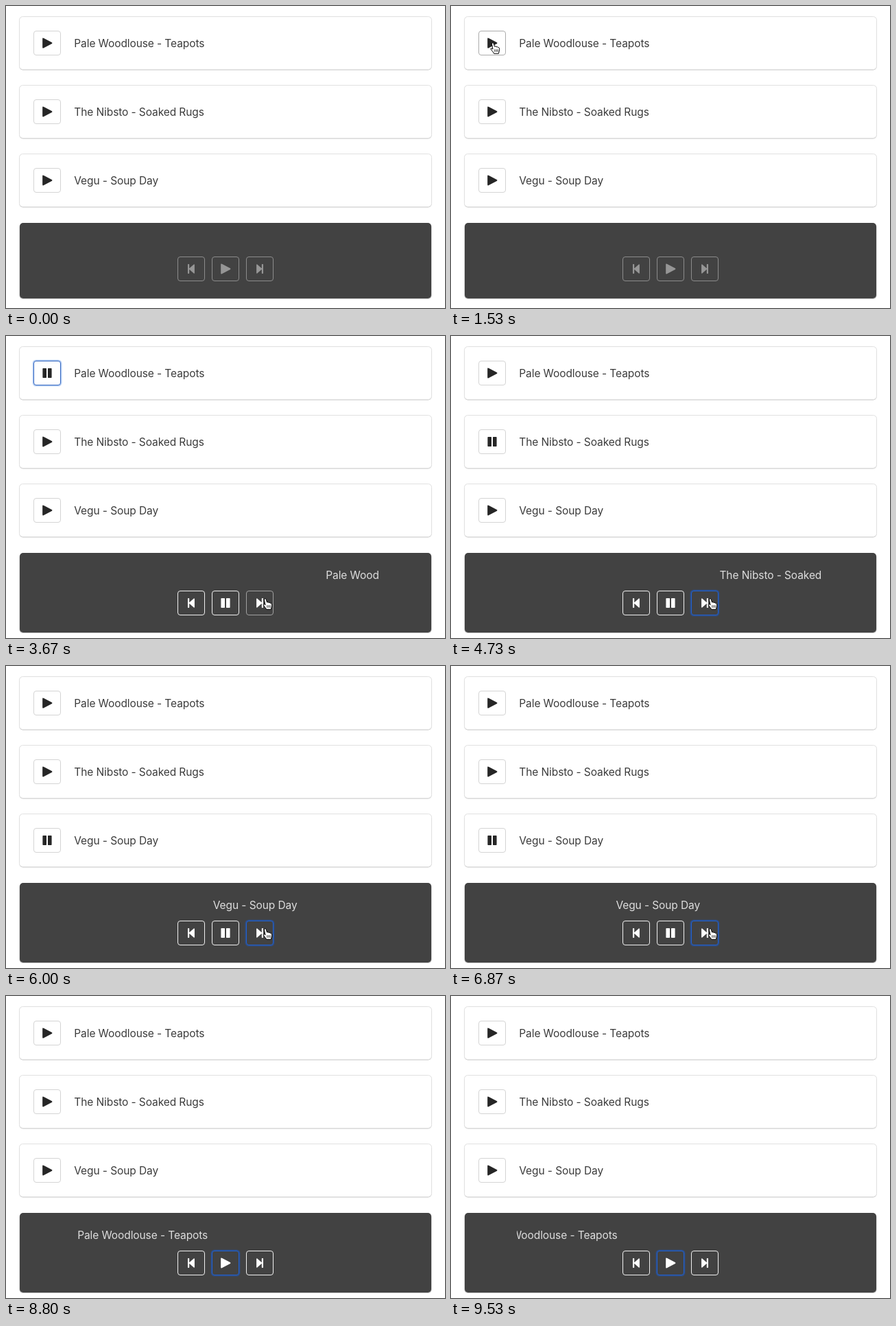
Recreate the animation shown at these times as an HTML page. Size 640 px wide and 440 px high, loop 9590 ms.

```html
<!DOCTYPE html>
<html lang="en">
<head>
<meta charset="utf-8">
<title>Playlist player</title>
<style>
  html, body { margin: 0; width: 100%; height: 100%; overflow: hidden; background: #fff; }
  svg { display: block; width: 640px; height: 440px; }
  text { font: 15.5px Inter, "Open Sans", sans-serif; letter-spacing: -0.09px; fill: #3b3b3b; white-space: pre; }
  .card { fill: #fff; stroke: #e0e0e0; }
  .shade { fill: #c6c6c6; }
  .panel { fill: #424242; }
  .box { fill: none; stroke: #d4d4d4; }
  .ring { fill: none; stroke: #bdd3f5; stroke-width: 2; visibility: hidden; }
  .icon { fill: #262626; stroke: #262626; stroke-width: 1.4; stroke-linejoin: round; }
  .hover .box { stroke: #ababab; }
  .focus .box { stroke: #2f64c0; }
  .focus .ring { visibility: visible; }
  .dark text { fill: #dedede; }
  .dark .box { stroke: #f0f0f0; }
  .dark .icon { fill: #fff; stroke: #fff; }
  .dark .hover .box { stroke: #a0a0a0; }
  .dark .focus .box { stroke: #2062d4; }
  .dark .ring { stroke: #2f4c80; }
  .off .box { stroke: #8c8c8c; }
  .off .icon { fill: #969696; stroke: #969696; }
</style>
</head>
<body>
<svg id="stage" viewBox="0 0 640 440">
  <defs><clipPath id="lane"><rect x="96" y="330" width="448" height="36"/></clipPath></defs>
</svg>
<script>
const LOOP = 9590;
const SONGS = ["Pale Woodlouse - Teapots", "The Nibsto - Soaked Rugs", "Vegu - Soup Day"];
const ICONS = {
  play: "M-6.1 -6.5Q-6.1 -7 -5.6 -6.7L6.4 -.4Q7 0 6.4 .4L-5.6 6.7Q-6.1 7 -6.1 6.5Z",
  pause: "M-5.9 -6.3h4.2v12.6h-4.2ZM1.7 -6.3h4.2v12.6h-4.2Z",
  prev: "M-4.3 -6.3h.8v12.6h-.8ZM4.2 -6L-2.6 0L4.2 6Z",
  next: "M4.3 -6.3h-.8v12.6h.8ZM-4.2 -6L2.6 0L-4.2 6Z"
};

// time, song (-1 = none), playing, focused button
const STATES = [
  [0, -1, false, null],
  [1735, 0, true, "row0"],
  [4010, 1, true, "next"],
  [5800, 2, true, "next"],
  [7140, 0, true, "next"],
  [8270, 0, false, "toggle"]
];

// time, x, y of the pointer's tip
const PATH = [
  [870, 150, 440], [1000, 138, 368], [1250, 92, 165], [1500, 61, 54],
  [2130, 61, 54], [2400, 192, 176], [2680, 330, 335], [2900, 378, 383],
  [7300, 378, 383], [7430, 352, 398], [7600, 322, 388],
  [8390, 322, 388], [8500, 330, 411], [8590, 338, 440]
];

const SPEED = 6 / 85;
const LANE_LEFT = 96, LANE_RIGHT = 544, WRAP = 2570;

const stage = document.getElementById("stage");

function add(parent, tag, attrs = {}, content) {
  const el = document.createElementNS("http://www.w3.org/2000/svg", tag);
  for (const key in attrs) el.setAttribute(key, attrs[key]);
  if (content) el.textContent = content;
  parent.append(el);
  return el;
}

function rect(parent, cls, x, y, width, height, rx) {
  return add(parent, "rect", { class: cls, x, y, width, height, rx });
}

function move(el, x, y) {
  el.setAttribute("transform", `translate(${x} ${y})`);
}

function makeButton(parent, name, x, y, icon) {
  const g = add(parent, "g");
  move(g, x, y);
  rect(g, "ring", -20.5, -18.5, 41, 37, 4.5);
  rect(g, "box", -19.5, -17.5, 39, 35, 3.5);
  return { name, x, y, g, icon: add(g, "path", { class: "icon", d: ICONS[icon] }) };
}

const rows = SONGS.map((song, i) => {
  const y = 54 + i * 100;
  rect(stage, "shade", 19.5, y - 37, 601, 76.4, 5);
  rect(stage, "card", 19.5, y - 38.5, 601, 77, 5);
  add(stage, "text", { x: 99.3, y: y + 6 }, song);
  return makeButton(stage, "row" + i, 60, y, "play");
});

const player = add(stage, "g", { class: "dark" });
const shade = rect(player, "shade", 19.5, 317, 601, 110, 5);
const panel = rect(player, "panel", 20, 316, 600, 110, 5);
const lane = add(player, "g", { "clip-path": "url(#lane)" });
const title = add(lane, "text", { y: 354 });
const controls = add(player, "g");
const prev = makeButton(controls, "prev", 270, 389, "prev");
const toggle = makeButton(controls, "toggle", 320, 389, "play");
const next = makeButton(controls, "next", 370, 389, "next");
const buttons = [...rows, prev, toggle, next];

const arrow = add(stage, "path", {
  d: "M0 0V14.4L3.3 11.3L5.6 16.6L8.2 15.5L5.9 10.3H10.4Z",
  fill: "#000", stroke: "#fff", "stroke-width": 1, "stroke-linejoin": "round"
});
const hand = add(stage, "g");
add(hand, "path", {
  d: "M-1.6 1Q-1.5 -.6 0 -.4Q1 -.2 1.4 1.2L2.5 5Q4.3 4 5 5.4Q6.8 4.7 7.4 6.3Q9 5.8 9.4 7.4Q10 9.6 9.2 12L8.4 15.3H1.6Q.6 13 -1.2 11.2Q-3.7 8.7 -2.8 7.8Q-1.7 7 0 9Z",
  fill: "#fff", stroke: "#000", "stroke-width": 1, "stroke-linejoin": "round"
});
add(hand, "path", { d: "M2.8 9.2v3.6M5 9.2v3.6M7.1 9.2v3.6", stroke: "#000", "stroke-width": .8 });

function pointerAt(t) {
  const i = PATH.findIndex(p => p[0] > t);
  if (i < 1) return null;
  const [t0, x0, y0] = PATH[i - 1], [t1, x1, y1] = PATH[i];
  const k = (t - t0) / (t1 - t0);
  return { x: x0 + (x1 - x0) * k, y: y0 + (y1 - y0) * k };
}

// The strip re-enters from the right once its start reaches the left edge.
function titleX(t) {
  return (t < WRAP ? LANE_LEFT : LANE_RIGHT) - (t - WRAP) * SPEED;
}

function draw(t) {
  const [, song, playing, focused] = STATES.findLast(s => s[0] <= t);
  const idle = song < 0;
  const lift = idle ? -6 : 0;
  const pointer = pointerAt(t);
  let over = false;

  panel.setAttribute("height", 116 + lift);
  shade.setAttribute("height", 116 + lift);
  move(controls, 0, lift);
  controls.setAttribute("class", idle ? "off" : "");
  title.textContent = idle ? "" : SONGS[song];
  title.setAttribute("x", titleX(t));

  rows.forEach((row, i) => row.icon.setAttribute("d", ICONS[playing && i === song ? "pause" : "play"]));
  toggle.icon.setAttribute("d", ICONS[playing ? "pause" : "play"]);

  for (const b of buttons) {
    const live = !idle || rows.includes(b);
    const hit = live && pointer && Math.abs(pointer.x - b.x) < 20 && Math.abs(pointer.y - b.y) < 18;
    over = over || hit;
    b.g.setAttribute("class", (hit ? "hover " : "") + (b.name === focused ? "focus" : ""));
  }

  arrow.style.display = pointer && !over ? "" : "none";
  hand.style.display = pointer && over ? "" : "none";
  if (pointer) move(over ? hand : arrow, pointer.x, pointer.y);
}

const start = performance.now();
function tick() {
  draw((performance.now() - start) % LOOP);
  requestAnimationFrame(tick);
}
tick();
</script>
</body>
</html>
```
